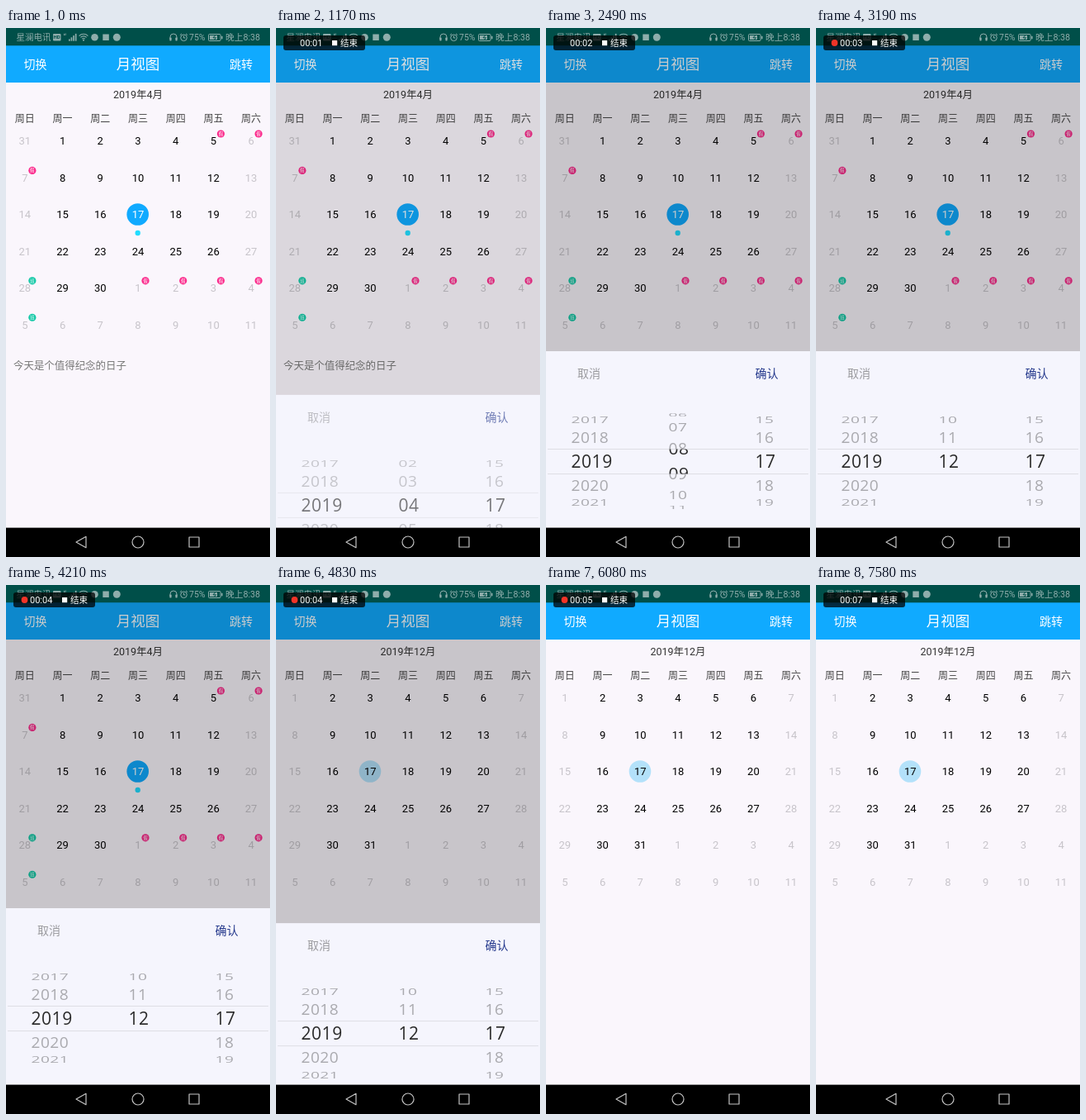
An HTML page for the animation above (7.62 s loop, 320 by 640 pixels).

```html
<!DOCTYPE html>
<html lang="zh-CN">
<head>
<meta charset="utf-8">
<title>月视图</title>
<style>
html, body { margin: 0; width: 100%; height: 100%; overflow: hidden; background: #000; }
svg { display: block; width: 320px; height: 640px; }
text { font-family: Roboto, "Noto Sans CJK SC", "Noto Sans CJK", sans-serif; white-space: pre; }
.wheel text { font-family: "Open Sans", "Noto Sans", sans-serif; font-size: 21px; letter-spacing: .55px; }
</style>
</head>
<body>
<svg id="stage" viewBox="0 0 320 640"></svg>
<script>
const LOOP = 7620;
const HEADER_TOP = 21.3, SHEET_TOP = 391, SCREEN_BOTTOM = 604.6;
const SHEET_HEIGHT = SCREEN_BOTTOM - SHEET_TOP;
const WHEEL_MID = 133.5, WHEEL_RADIUS = 58;
const BLUE = '#10aaff', PALE = '#c7c4ca', STATUS = '#8fadab';
const stage = document.getElementById('stage');

function add(parent, tag, attrs = {}) {
  const node = document.createElementNS('http://www.w3.org/2000/svg', tag);
  for (const key in attrs) node.setAttribute(key, attrs[key]);
  parent.appendChild(node);
  return node;
}
const group = (parent, attrs) => add(parent, 'g', attrs);
const rect = (parent, x, y, width, height, fill, more) =>
  add(parent, 'rect', { x, y, width, height, fill, ...more });
const circle = (parent, cx, cy, r, fill, more) => add(parent, 'circle', { cx, cy, r, fill, ...more });
const path = (parent, d, stroke, more) =>
  add(parent, 'path', { d, stroke, fill: 'none', ...more });

// y is the vertical middle of the glyphs
function label(parent, str, x, y, size, fill, anchor = 'middle') {
  const node = add(parent, 'text', {
    x, y: y + size * .36, 'font-size': size, fill, 'text-anchor': anchor
  });
  node.textContent = str;
  return node;
}

function clip(id, ...boxes) {
  const node = add(defs, 'clipPath', { id });
  for (const box of boxes) rect(node, ...box);
}

const clamp = v => Math.min(1, Math.max(0, v));
const progress = (t, start, duration) => clamp((t - start) / duration);
const show = (node, visible) => node.setAttribute('visibility', visible ? 'visible' : 'hidden');

const defs = add(stage, 'defs');
clip('center', [0, 118.5, 320, 30]);
clip('outside', [0, 60, 320, 58.5], [0, 148.5, 320, 65.5]);

function buildStatusBar() {
  const bar = group(stage);
  rect(bar, 0, 0, 320, 22, '#004f49');
  label(bar, '星澜电讯', 12.5, 11.3, 10.5, STATUS, 'start');
  rect(bar, 57, 7, 9.5, 8.5, STATUS, { rx: 1 });
  label(bar, 'HD', 61.7, 11.3, 6, '#004f49').setAttribute('font-weight', 700);
  label(bar, '“', 69.5, 11, 10, STATUS, 'start');
  for (let i = 0; i < 4; i++) rect(bar, 76 + i * 2.6, 13.5 - i * 2.2, 1.7, 2.2 + i * 2.2, STATUS);
  for (const r of [2.5, 5, 7.5]) {
    const d = r * .72;
    path(bar, `M${94 - d} ${15 - d}A${r} ${r} 0 0 1 ${94 + d} ${15 - d}`, STATUS, { 'stroke-width': 1.1 });
  }
  circle(bar, 94, 14.7, 1, STATUS);
  circle(bar, 107.5, 11.3, 4.3, STATUS);
  rect(bar, 117.3, 7.5, 7.5, 7.5, STATUS);
  circle(bar, 134.3, 11.3, 4.5, STATUS);

  path(bar, 'M199 13V11a4 4 0 0 1 8 0V13', STATUS);
  rect(bar, 198.3, 11.5, 2.3, 4, STATUS, { rx: .8 });
  rect(bar, 205.4, 11.5, 2.3, 4, STATUS, { rx: .8 });
  circle(bar, 215.5, 11.8, 3.8, 'none', { stroke: STATUS });
  path(bar, 'M215.5 9.5V12H217.3M210.8 8.8L213 6.8M220.2 8.8L218 6.8', STATUS);
  label(bar, '75%', 222, 11.3, 10.5, STATUS, 'start');
  rect(bar, 245.5, 7.5, 14.5, 8, 'none', { stroke: STATUS, rx: 1 });
  rect(bar, 247, 9, 9, 5, STATUS);
  rect(bar, 261, 9.8, 1.5, 3.5, STATUS);
  path(bar, 'M254 8.5L251 11.8H254.5L252 14.8', '#004f49');
  label(bar, '晚上8:38', 266, 11.3, 10.7, STATUS, 'start');
}

function buildHeader() {
  rect(stage, 0, HEADER_TOP, 320, 66 - HEADER_TOP, BLUE);
  label(stage, '切换', 35.5, 44.1, 14, '#fff');
  label(stage, '月视图', 160, 44.1, 17.5, '#fff');
  label(stage, '跳转', 285, 44.1, 14, '#fff');
}

const columnX = i => 22.86 + 45.71 * i;
const rowY = i => 136.8 + 44.45 * i;

function buildMonth(month, leading, selectedFill, selectedText, holidays, workdays) {
  const page = group(stage);
  label(page, `2019年${month}月`, 160, 80.7, 12.5, '#333');
  for (let i = 0; i < 42; i++) {
    const date = new Date(2019, month - 1, 1 + i - leading);
    const inMonth = date.getMonth() === month - 1;
    const day = date.getDate(), column = i % 7;
    const x = columnX(column), y = rowY(Math.floor(i / 7));
    const selected = inMonth && day === 17;
    if (selected) circle(page, x - .3, y - .2, 13.3, selectedFill);
    const plain = inMonth && column % 6 !== 0;
    label(page, day, x, y, 13, selected ? selectedText : plain ? '#000' : PALE);
    const key = `${date.getMonth() + 1}/${day}`;
    const off = holidays.includes(key);
    if (off || workdays.includes(key)) {
      circle(page, x + 9, y - 8.8, 4.6, off ? '#fb2a8c' : '#12c8a6');
      label(page, off ? '假' : '班', x + 9, y - 8.8, 5.5, '#fff');
    }
  }
  return page;
}

function buildWheel(parent, x, first, last) {
  const wheel = group(parent, { class: 'wheel' });
  const layers = [
    { id: 'outside', fill: '#a9a9ae', stretch: .91 },
    { id: 'center', fill: '#2a2a2a', stretch: 1 }
  ].map(layer => ({ ...layer, node: group(wheel, { 'clip-path': `url(#${layer.id})`, fill: layer.fill }) }));
  const items = [];
  for (let value = first; value <= last; value++) {
    for (const { node, stretch } of layers) {
      const text = add(node, 'text', { y: 7.5 });
      text.textContent = String(value).padStart(2, '0');
      items.push({ text, value, stretch });
    }
  }
  return position => {
    for (const { text, value, stretch } of items) {
      const angle = (value - position) * Math.PI / 6;
      const visible = Math.abs(angle) < 1.5;
      text.setAttribute('display', visible ? 'inline' : 'none');
      if (!visible) continue;
      const y = WHEEL_MID + WHEEL_RADIUS * Math.sin(angle);
      text.setAttribute('transform', `translate(${x} ${y}) scale(${stretch} ${Math.cos(angle)})`);
    }
  };
}

function buildNavBar() {
  rect(stage, 0, SCREEN_BOTTOM, 320, 36, '#000');
  const line = { 'stroke-width': 1.2, 'stroke-linejoin': 'round' };
  path(stage, 'M85 622L97 615.3V628.7Z', '#c4c4c4', line);
  circle(stage, 160, 622, 7, 'none', { stroke: '#c4c4c4', ...line });
  rect(stage, 222, 616, 12, 12, 'none', { stroke: '#c4c4c4', ...line });
}

rect(stage, 0, 0, 320, 640, '#faf6fc');
buildStatusBar();
buildHeader();
[...'日一二三四五六'].forEach((d, i) => label(stage, '周' + d, columnX(i), 110, 12, '#444'));

const april = buildMonth(4, 1, BLUE, '#fff',
  ['4/5', '4/6', '4/7', '5/1', '5/2', '5/3', '5/4'], ['4/28', '5/5']);
circle(april, 159.7, 248, 3.2, '#22dcff');
label(april, '今天是个值得纪念的日子', 9, 408.8, 12.45, '#777', 'start');
const december = buildMonth(12, 0, '#b3e1fa', '#000', [], []);

const dim = rect(stage, 0, HEADER_TOP, 320, SCREEN_BOTTOM - HEADER_TOP, '#000');

const sheet = group(stage);
rect(sheet, 0, 0, 320, SHEET_HEIGHT, '#f5f5fd');
const controls = group(sheet);
label(controls, '取消', 52, 27.2, 14, '#9b9b9f');
label(controls, '确认', 267.5, 27.2, 14, '#24388c').setAttribute('font-weight', 500);
for (const y of [118.5, 148.5]) path(controls, `M2 ${y}H318`, '#dedee4');
buildWheel(controls, 30.5, 2017, 2021)(2019);
const turnMonths = buildWheel(controls, 148.5, 1, 12);
buildWheel(controls, 253.5, 15, 19)(17);
buildNavBar();

const recorder = group(stage);
rect(recorder, 9, 9, 99, 18, '#000', { rx: 3, opacity: .75 });
const recordDot = circle(recorder, 22.5, 18, 3.9, '#f23428');
const clock = label(recorder, '', 29, 18.2, 11, '#fff', 'start');
rect(recorder, 68, 15, 6.2, 6.2, '#fff');
label(recorder, '结束', 78, 18, 10.5, '#fff', 'start');

// the record dot flips at each of these times
const BLINKS = [520, 1570, 2080, 2570, 3590, 4100, 5110, 5600, 6100, 6630, 7110];

function render(t) {
  recorder.setAttribute('opacity', progress(t, 30, 160));
  show(recordDot, BLINKS.filter(b => b <= t).length % 2 === 0);
  clock.textContent = '00:0' + Math.max(0, Math.floor((t - 1040) / 1015) + 1);

  const jumped = t >= 4680;
  show(april, !jumped);
  show(december, jumped);

  const rise = progress(t, 970, 400), fall = progress(t, 4718, 388);
  const hidden = (1 - rise) ** 2 + fall ** 2;
  sheet.setAttribute('transform', `translate(0 ${SHEET_TOP + SHEET_HEIGHT * hidden})`);
  show(sheet, hidden < 1);

  const fadeIn = progress(t, 970, 322);
  controls.setAttribute('opacity', fadeIn);
  dim.setAttribute('opacity', .2 * (fadeIn - progress(t, 5100, 150)));

  turnMonths(4 + 8 * (1 - (1 - progress(t, 2000, 1190)) ** 1.57));
}

const begin = performance.now();
function tick() {
  render((performance.now() - begin) % LOOP);
  requestAnimationFrame(tick);
}
render(0);
requestAnimationFrame(tick);
</script>
</body>
</html>
```
